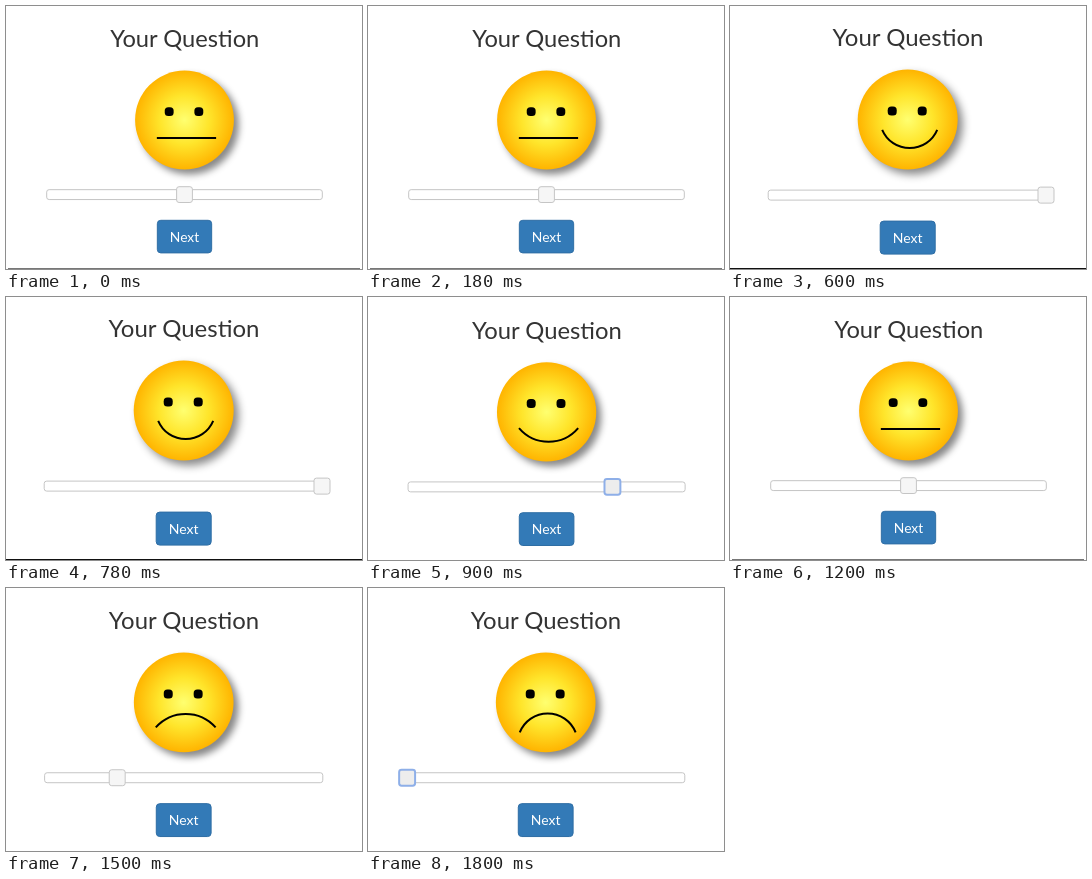
Write an HTML page that moves like this. It is 356 px wide and 263 px high and loops after 2100 ms.

```html
<!DOCTYPE html>
<html lang="en">
<head>
<meta charset="utf-8">
<title>Smiley slider</title>
<style>
html, body { margin: 0; width: 100%; height: 100%; overflow: hidden; background: #fff; }
svg { display: block; }
text { font-family: Lato, sans-serif; text-anchor: middle; }
#face { filter: drop-shadow(5px 5px 4px #0007); }
#mouth { fill: none; stroke: #000; stroke-width: 2; }
#knob { fill: #f6f6f6; stroke: #c5c5c5; }
#knob.focus { fill: #ededed; stroke: #8eafe8; stroke-width: 2; }
</style>
</head>
<body>
<svg width="356" height="263" viewBox="0 0 356 263">
  <defs>
    <radialGradient id="skin">
      <stop offset="0" stop-color="#ffff70"/>
      <stop offset=".5" stop-color="#ffe52b"/>
      <stop offset="1" stop-color="#ffb400"/>
    </radialGradient>
  </defs>
  <g id="page">
    <text x="178.3" y="40.3" font-size="24" fill="#333">Your Question</text>
    <circle id="face" cx="178" cy="114" r="50" fill="url(#skin)"/>
    <rect x="158" y="101" width="9" height="9" rx="3.6"/>
    <rect x="188" y="101" width="9" height="9" rx="3.6"/>
    <path id="mouth"/>
    <rect x="38.5" y="184.5" width="279" height="10" rx="2.5" fill="#fff" stroke="#c5c5c5"/>
    <rect id="knob" y="181.5" width="16" height="16" rx="2.5"/>
    <rect x="150.5" y="215.5" width="55" height="33" rx="3.5" fill="#337ab7" stroke="#2e6da4"/>
    <text x="178" y="237" font-size="14" fill="#fff">Next</text>
  </g>
  <rect id="edge" y="262" height="1"/>
</svg>
<script>
const $ = id => document.getElementById(id);
const MID = 178, TOP = 32, HOLD = 300;

// view: [centre x, title y, scale]; mouth: [half width, corner y, sag]; edge: [x, width, colour]
const neutral = { view: [178.5, 33, .988], mouth: [30, 132.2, 0], knob: 0, edge: [2, 352, '#777'] };
const poses = [
  neutral,
  { view: [178, 32, 1], mouth: [30, 129.5, 13.7], knob: 72.5, focus: true },
  { view: [177.7, 31.6, 1], mouth: [27.5, 124.2, 18.3], knob: 138.3, edge: [0, 356, '#111'] },
  { view: [178.6, 33.5, .993], mouth: [29.8, 130.4, 13.7], knob: 66.3, focus: true },
  neutral,
  { view: [177.7, 32.7, .997], mouth: [30, 139, -13.5], knob: -66.7 },
  { view: [177.7, 32.7, .997], mouth: [28, 144, -19], knob: -139, focus: true }
];

function mouthPath([half, y, sag]) {
  const from = `M${MID + 2 - half} ${y}`, to = `${MID + 2 + half} ${y}`;
  if (!sag) return `${from}L${to}`;
  const r = (half * half + sag * sag) / (2 * Math.abs(sag));
  return `${from}A${r} ${r} 0 0 ${sag > 0 ? 0 : 1} ${to}`;
}

function draw(now) {
  const { view: [x, y, scale], mouth, knob, focus, edge = [0, 0, '#fff'] } =
    poses[Math.floor(now / HOLD) % poses.length];
  $('page').setAttribute('transform',
    `translate(${x} ${y}) scale(${scale}) translate(${-MID} ${-TOP})`);
  $('mouth').setAttribute('d', mouthPath(mouth));
  $('knob').setAttribute('x', MID + knob - 8);
  $('knob').setAttribute('class', focus ? 'focus' : '');
  ['x', 'width', 'fill'].forEach((key, i) => $('edge').setAttribute(key, edge[i]));
}

const start = performance.now();
function tick() {
  draw(performance.now() - start);
  requestAnimationFrame(tick);
}
tick();
</script>
</body>
</html>
```
